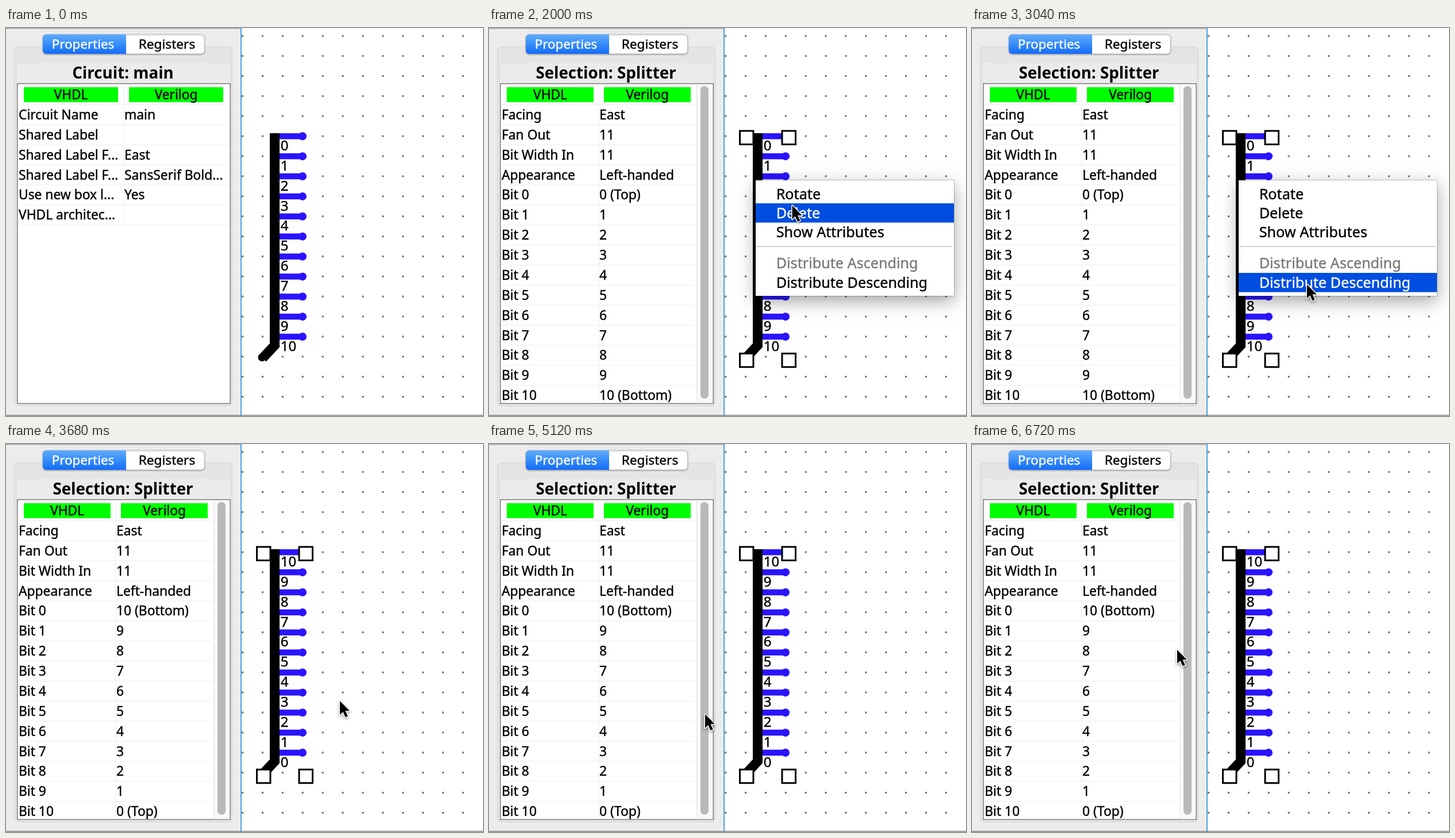
These frames come from a looping animation (830x675 px, 6800 ms). An HTML page with a canvas:

```html
<!DOCTYPE html>
<html lang="en">
<head>
<meta charset="utf-8">
<title>Splitter menu</title>
<style>
  html, body { margin: 0; width: 100%; height: 100%; overflow: hidden; background: #fff; }
  canvas { display: block; }
</style>
</head>
<body>
<canvas id="stage" width="830" height="675"></canvas>
<script>
const ctx = document.getElementById('stage').getContext('2d');
const LOOP = 6800, STEP = 80, PITCH = 34.87, BITS = 11;
const SELECT = 960, RELEASE = 1360, MENU_OPEN = 1600, MENU_CLOSE = 3280;
const BLUE = '#2a14ff';

// Pointer path: time, x, y
const PATH = [
  [80, 613, 588], [880, 464, 262], [1600, 464, 263], [2240, 557, 330], [2400, 558, 331],
  [2960, 583, 446], [3280, 582, 447], [3680, 581, 447], [4400, 450, 466], [5120, 376, 470],
  [5760, 362, 400], [6400, 354, 359], [6480, 354, 359], [6560, 357, 358], [6800, 357, 358]
];

const MENU = [
  ['Rotate', 272], ['Delete', 305], ['Show Attributes', 338.5],
  ['Distribute Ascending', 392.5, true], ['Distribute Descending', 426]
];

const CIRCUIT_ROWS = [
  ['Circuit Name', 'main'], ['Shared Label', ''], ['Shared Label F...', 'East'],
  ['Shared Label F...', 'SansSerif Bold...'], ['Use new box l...', 'Yes'], ['VHDL architec...', '']
];

function rect(x, y, w, h, fill) {
  ctx.fillStyle = fill;
  ctx.fillRect(x, y, w, h);
}

function round(x, y, w, h, r, fill, stroke) {
  ctx.beginPath();
  ctx.roundRect(x, y, w, h, r);
  ctx.fillStyle = fill;
  ctx.fill();
  if (stroke) {
    ctx.strokeStyle = stroke;
    ctx.lineWidth = 1;
    ctx.stroke();
  }
}

// A hairline outline gives the regular weight a slightly sturdier look.
function text(str, x, y, size = 23, color = '#000', align = 'left', weight = 400) {
  ctx.font = `${weight} ${size}px "Noto Sans", "Open Sans", sans-serif`;
  ctx.textAlign = align;
  ctx.fillStyle = ctx.strokeStyle = color;
  ctx.lineWidth = 0.4;
  ctx.fillText(str, x, y);
  if (weight === 400) ctx.strokeText(str, x, y);
}

function shadow(color, blur, dy) {
  ctx.shadowColor = color;
  ctx.shadowBlur = blur;
  ctx.shadowOffsetY = dy;
}

function pointerAt(t) {
  const i = PATH.findIndex(p => p[0] > t);
  const [t0, x0, y0] = PATH[i - 1], [t1, x1, y1] = PATH[i];
  const u = (t - t0) / (t1 - t0), k = u * u * (3 - 2 * u);
  return [x0 + (x1 - x0) * k, y0 + (y1 - y0) * k];
}

function splitterRows(reversed) {
  const rows = [['Facing', 'East'], ['Fan Out', '11'], ['Bit Width In', '11'], ['Appearance', 'Left-handed']];
  for (let i = 0; i < BITS; i++) {
    const n = reversed ? BITS - 1 - i : i;
    rows.push(['Bit ' + i, n + (n === 0 ? ' (Top)' : n === BITS - 1 ? ' (Bottom)' : '')]);
  }
  return rows;
}

function drawTabs() {
  ctx.save();
  shadow('rgba(0,0,0,.3)', 2, 1);
  round(64, 11, 281.5, 34, 6, '#fff', '#c4c4c4');
  ctx.restore();
  const g = ctx.createLinearGradient(0, 11, 0, 45);
  g.addColorStop(0, '#62acfa');
  g.addColorStop(0.5, '#378cf9');
  g.addColorStop(1, '#146cf7');
  round(64, 11, 145, 34, [6, 0, 0, 6], g);
  text('Properties', 134, 36, 22.3, '#fff', 'center');
  text('Registers', 280, 36, 22.6, '#000', 'center');
}

function drawPanel(selected, reversed) {
  rect(0, 0, 408, 675, '#ececec');
  rect(0, 0, 408, 1.5, '#a6a6a6');
  round(14.5, 32.5, 379, 625, 6, '#e4e4e4', '#d3d3d3');
  drawTabs();
  rect(20, 61, 370, 36, '#ebebeb');
  text(selected ? 'Selection: Splitter' : 'Circuit: main', 203.5, 88, 27.7, '#000', 'center', 700);

  rect(19, 96, 372, 558, '#7c7c7c');
  rect(20.5, 97.5, 369, 555, '#fff');
  const rows = selected ? splitterRows(reversed) : CIRCUIT_ROWS;
  const split = selected ? 191 : 205, right = selected ? 358 : 386;
  const badge = selected ? 151 : 164;
  [['VHDL', 31], ['Verilog', split + 9]].forEach(([name, x]) => {
    rect(x, 103, badge, 26, '#00ff00');
    text(name, x + badge / 2, 124, 22.7, '#000', 'center');
  });

  ctx.save();
  ctx.beginPath();
  ctx.rect(20.5, 97.5, 369, 555);
  ctx.clip();
  for (let i = 0; i <= rows.length; i++) rect(21, 133 + i * PITCH, right - 21, 1, '#ededed');
  rect(split - 0.5, 98, 1, 35 + rows.length * PITCH, '#ededed');
  rows.forEach(([key, value], i) => {
    const y = 159 + i * PITCH;
    text(key, 22, y, 22.8);
    text(value, split + 1, y, 22.8);
  });
  if (selected) {
    rect(361, 98, 28, 555, '#f8f8f8');
    rect(361, 98, 1, 555, '#e4e4e4');
    round(368, 101, 14, 544, 7, '#b9b9b9');
  }
  ctx.restore();
}

function drawSpine(color) {
  ctx.strokeStyle = color;
  ctx.lineWidth = 17;
  ctx.lineJoin = 'miter';
  ctx.beginPath();
  ctx.moveTo(467.5, 183);
  ctx.lineTo(467.5, 552);
  ctx.lineTo(446.5, 574.5);
  ctx.stroke();
}

function dot(x, y, r, fill) {
  ctx.beginPath();
  ctx.arc(x, y, r, 0, 7);
  ctx.fillStyle = fill;
  ctx.fill();
}

function drawSplitter(reversed, ghost) {
  for (let i = 0; i < BITS; i++) {
    const y = 188.3 + i * PITCH;
    rect(476, y - 5.2, ghost ? 46 : 40, 10.4, BLUE);
    if (!ghost) dot(516, y, 7, BLUE);
    text(reversed ? BITS - 1 - i : i, 477.8, y + 24.7, 24);
  }
  drawSpine(ghost ? '#757575' : '#000');
  if (!ghost) dot(445.5, 573, 7, '#000');
}

function drawHandles() {
  ctx.lineWidth = 3;
  ctx.strokeStyle = '#000';
  for (const x of [436.5, 510]) for (const y of [179, 566.3]) {
    rect(x, y, 23.5, 23.5, '#fff');
    ctx.strokeRect(x, y, 23.5, 23.5);
  }
}

function drawCanvasArea(selected, reversed, ghost) {
  rect(410, 0, 420, 675, '#fff');
  for (let x = 411.7; x < 830; x += PITCH)
    for (let y = 13.8; y < 650; y += PITCH) rect(x - 1.5, y - 1.5, 3, 3, '#6c6c6c');
  drawSplitter(reversed, false);
  if (selected) drawHandles();
  if (ghost) drawSplitter(reversed, true);
}

function drawMenu(py) {
  ctx.save();
  shadow('rgba(0,0,0,.36)', 28, 9);
  rect(464, 265, 345, 201, '#fff');
  ctx.restore();
  ctx.strokeStyle = 'rgba(0,0,0,.22)';
  ctx.lineWidth = 1;
  ctx.strokeRect(463.5, 264.5, 346, 202);
  rect(465, 379.5, 341, 1.5, '#c6c6c6');
  for (const [label, y, disabled] of MENU) {
    const hot = !disabled && py >= y && py < y + 33;
    if (hot) rect(464, y, 345, 33.5, '#004ee0');
    text(label, 499.7, y + 25.5, 25.2, disabled ? '#787878' : hot ? '#fff' : '#000');
  }
}

function drawPointer(x, y) {
  ctx.save();
  ctx.translate(x, y);
  ctx.beginPath();
  [[0, 0], [0, 24], [5.3, 19], [9.6, 28.3], [13.8, 26.4], [9.6, 17.3], [17, 17.3]]
    .forEach(p => ctx.lineTo(...p));
  ctx.closePath();
  shadow('rgba(0,0,0,.4)', 4, 2);
  ctx.strokeStyle = '#fff';
  ctx.lineWidth = 3;
  ctx.lineJoin = 'round';
  ctx.stroke();
  shadow('transparent', 0, 0);
  ctx.fillStyle = '#000';
  ctx.fill();
  ctx.restore();
}

function draw(now) {
  const t = Math.floor((now % LOOP) / STEP) * STEP;
  const selected = t >= SELECT, reversed = t >= MENU_CLOSE;
  drawCanvasArea(selected, reversed, selected && t < RELEASE);
  drawPanel(selected, reversed);
  rect(408, 0, 2, 675, '#4ba3e3');
  rect(0, 673, 830, 1.5, '#808080');
  if (t >= PATH[0][0]) {
    const [x, y] = pointerAt(t);
    if (t >= MENU_OPEN && !reversed) drawMenu(y);
    drawPointer(x, y);
  }
}

const start = performance.now();
function tick() {
  draw(performance.now() - start);
  requestAnimationFrame(tick);
}
tick();
</script>
</body>
</html>
```
